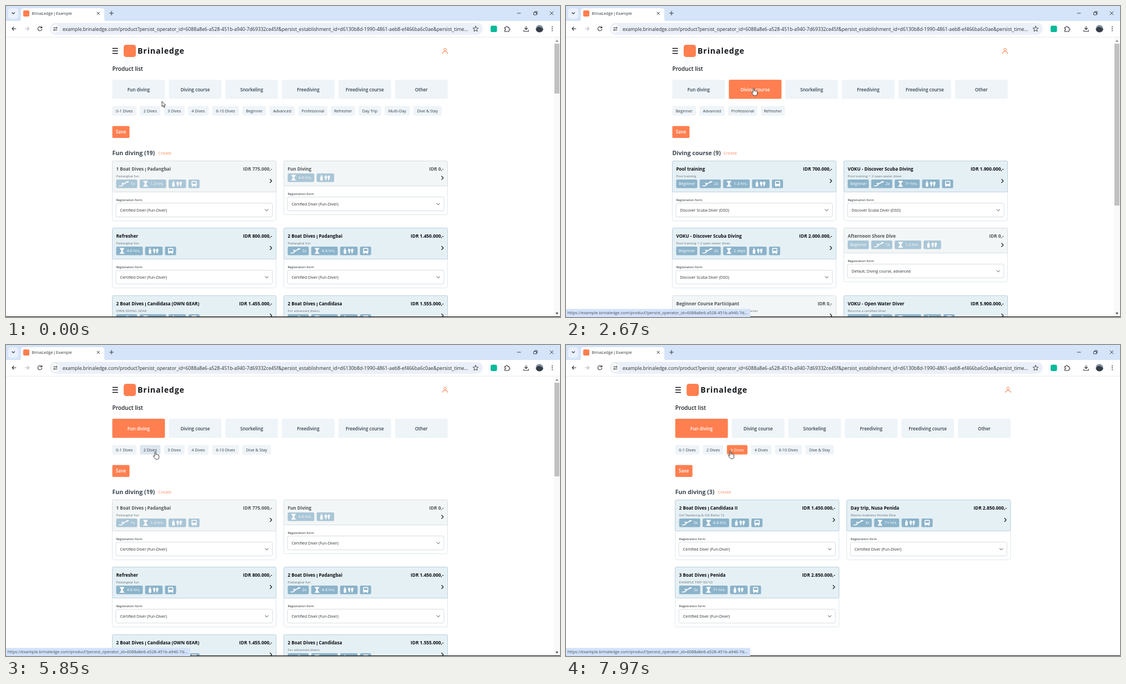
An HTML page that plays this animation: 998 px wide and 561 px high, repeating every 8 s.

```html
<!DOCTYPE html>
<html lang="en">
<head>
<meta charset="utf-8">
<title>BrinaLedge | Example</title>
<style>
  html, body { margin: 0; width: 100%; height: 100%; overflow: hidden; background: #fff; }
  svg { display: block; width: 100vw; height: 100vh; font-family: "Open Sans", "Noto Sans", sans-serif; }
  .line { fill: none; stroke-linecap: round; stroke-linejoin: round; }
</style>
</head>
<body>
<svg id="stage" viewBox="0 0 998 561"></svg>
<script>
const LOOP = 8000;
const CORAL = '#ff7f50', TAB = '#eef4f8', HOVER = '#dde6ee', TAG = '#8bb3ca';
const stage = document.getElementById('stage');

// ---------- drawing helpers ----------
const rect = (x, y, w, h, fill, r = 0, more = '') =>
  `<rect x="${x}" y="${y}" width="${w}" height="${h}" rx="${r}" fill="${fill}" ${more}/>`;
const circle = (x, y, r, fill, more = '') => `<circle cx="${x}" cy="${y}" r="${r}" fill="${fill}" ${more}/>`;
const line = (d, color, width = 1) => `<path class="line" d="${d}" stroke="${color}" stroke-width="${width}"/>`;
const fill = (d, color) => `<path d="${d}" fill="${color}"/>`;
const at = (x, y, body, more = '') => `<g transform="translate(${x} ${y})" ${more}>${body}</g>`;
const text = (x, y, s, size, color, weight = 400, anchor = 'start', more = '') =>
  `<text x="${x}" y="${y}" font-size="${size}" fill="${color}" font-weight="${weight}" text-anchor="${anchor}" ${more}>` +
  s.replace(/&/g, '&amp;').replace('|', '<tspan font-family="Liberation Sans, sans-serif">|</tspan>') + '</text>';

// ---------- content ----------
const HOST = 'example.brinaledge.com/product?persist_operator_id=6088a8e6-a528-451b-a940-7d';
const URL_TEXT = HOST + '69332ce45f&persist_establishment_id=d6130b8d-1990-4861-aeb8-ef466ba6c0ae&persist_time...';
const TABS = ['Fun diving', 'Diving course', 'Snorkeling', 'Freediving', 'Freediving course', 'Other'];
const CHIP_WIDTH = {
  '0-1 Dives': 43.5, '2 Dives': 37, '3 Dives': 37, '4 Dives': 37, '6-10 Dives': 48.5, 'Beginner': 42.5,
  'Advanced': 45.5, 'Professional': 52.5, 'Refresher': 43.5, 'Day Trip': 40.5, 'Multi-Day': 45.5, 'Dive & Stay': 51
};
const ALL_CHIPS = Object.keys(CHIP_WIDTH);
const FUN_CHIPS = [...ALL_CHIPS.slice(0, 5), 'Dive & Stay'];
const CERTIFIED = 'Certified Diver (Fun-Diver)', DISCOVER = 'Discover Scuba Diver (DSD)';
const BOAT = 'd2x,h4-6 hrs.,f,b';

const card = (title, price, sub, tags, form = CERTIFIED, off = false) => ({ title, price, sub, tags, form, off });
const padangbai = card('2 Boat Dives | Padangbai', '1.450.000', 'Padangbai fun', BOAT);
const ownGear = card('2 Boat Dives | Candidasa (OWN GEAR)', '1.455.000', 'OWN DIVING GEAR', BOAT);
const candidasa = card('2 Boat Dives | Candidasa', '1.555.000', 'For advanced divers', BOAT);

const FUN = [
  card('1 Boat Dives | Padangbai', '775.000', 'Padangbai fun', 'd1x,h1-3 hrs.,f,b', CERTIFIED, true),
  card('Fun Diving', '0', '', 'h4-6 hrs.,f', CERTIFIED, true),
  card('Refresher', '800.000', 'Padangbai fun', 'h4-6 hrs.,f,b'),
  padangbai, ownGear, candidasa
];
const COURSE = [
  card('Pool training', '700.000', 'Pool training', 'B,d2x,h1-3 hrs.,f,b', DISCOVER),
  card('VOKU - Discover Scuba Diving', '1.900.000', 'Pool training + 2 open water dives', 'B,d2x,h7+ hrs.,f,b', DISCOVER),
  card('VOKU - Discover Scuba Diving', '2.000.000', 'Pool training + 2 open water dives', 'B,d2x,h2 days,f,b', DISCOVER),
  card('Afternoon Shore Dive', '0', '', 'B,d1x,h1-2 hrs.,f', 'Default, Diving course, advanced', true),
  card('Beginner Course Participant', '0', 'For participants who start their course at the center', 'B,d2x', '', true),
  card('VOKU - Open Water Diver', '5.900.000', 'Become a certified diver', 'B,d4x,h3-4 days,f,b')
];
const SNORKEL = [
  card('Snorkel day trip, Padangbai', '1.100.000', 'Snorkeling in Padangbai', 's2x,h4-6 hrs.,m,b', 'Snorkeler or Non-Diver'),
  card('Snorkel day trip, Nusa Penida', '1.100.000', "Snorkeling with Manta's", 's3x,h7+ hrs.,m,b', 'Snorkeler or Non-Diver'),
  card('Snorkel day trip, Nusa Penida', '1.100.000', "Snorkeling with Manta's", 's6x,h2 days,m,b', 'Course Participant, Beginner (Uncertified)')
];
const TWO_DIVES = [
  padangbai, ownGear, candidasa,
  card('2 Boat Dives | Padangbai', '1.600.000', 'MOSSYGILL EXAMPLE PRODUCT', BOAT, 'Mossy Gill example onboarding'),
  card('2 Boat Dives | Penida', '1.800.000', 'Penida day trip', BOAT),
  card('2 Shore Dives | Amed', '1.800.000', 'Shore diving day trip', 'd2x,h7+ hrs.,f,b')
];
const THREE_DIVES = [
  card('2 Boat Dives | Candidasa II', '1.450.000', 'Gili Tepekong & Gili Biaha 12', 'd3x,h4-6 hrs.,f,b'),
  card('Day trip, Nusa Penida', '2.850.000', 'Manta madness Penida Dive', 'd3x,h7+ hrs.,f,b'),
  card('3 Boat Dives | Penida', '2.850.000', 'EXAMPLE TRIP 3D/1D', 'd3x,h7+ hrs.,f,b')
];

// thumb is the lower end of the scrollbar thumb; 0 means the page does not scroll
const SCENES = [
  { from: 0, tab: -1, chips: ALL_CHIPS, title: 'Fun diving (19)', create: 82.7, cards: FUN, thumb: 158 },
  { from: 1040, tab: 0, chips: FUN_CHIPS, title: 'Fun diving (19)', create: 82.7, cards: FUN, thumb: 237 },
  { from: 2400, tab: 1, chips: ALL_CHIPS.slice(5, 9), title: 'Diving course (9)', create: 92.3, cards: COURSE, thumb: 360 },
  { from: 3940, tab: 2, chips: ALL_CHIPS.slice(9, 11), title: 'Snorkeling (3)', create: 77.5, cards: SNORKEL, thumb: 0 },
  { from: 5190, tab: 0, chips: FUN_CHIPS, title: 'Fun diving (19)', create: 82.7, cards: FUN, thumb: 237 },
  { from: 6640, tab: 0, chips: FUN_CHIPS, chip: '2 Dives', title: 'Fun diving (19)', create: 82.7, cards: TWO_DIVES, thumb: 238 },
  { from: 7940, tab: 0, chips: FUN_CHIPS, chip: '3 Dives', title: 'Fun diving (3)', create: 76.5, cards: THREE_DIVES, thumb: 0 }
];

// ---------- product cards ----------
const FINS = fill('M14 6q2.5-5 4.7 0l-1.5 6.5h-1zM19.5 6q2.5-5 4.7 0l-2.2 6.5h-1z', '#fff');
const ICONS = {
  d: line('M5.5 11.5h4l4.5-4-3.5-.8M14 7.5l4-2 4-1.5', '#fff', 1.7) + circle(19.5, 4, 1.3, '#fff'),
  s: line('M5.5 7l4 3.5 6-.5 5 1', '#fff', 1.7) + circle(23, 9, 1.5, '#fff'),
  h: line('M6.5 3h8M6.5 12.5h8', '#fff', 1.2) + fill('M7.5 3h6v2.2l-2.2 2.5 2.2 2.5v2.3h-6v-2.3l2.2-2.5-2.2-2.5z', '#fff'),
  f: rect(6.5, 5, 4.5, 8, '#fff', 1.5) + rect(7.7, 2.5, 2, 2, '#fff') + FINS,
  m: line('M7 3.5v6q0 2 4 1.5l1-3', '#fff', 1.3) + FINS,
  b: rect(5.5, 2.5, 9.5, 9, '#fff', 1.5) + rect(7, 4.2, 6.5, 3.6, TAG) +
     rect(6.3, 11, 2, 2, '#fff') + rect(12.2, 11, 2, 2, '#fff'),
  B: ''
};
const TAG_WIDTH = { d: 38, s: 41, f: 31.5, m: 31.5, b: 20, B: 38 };
const LABEL_X = { d: 26, s: 29, h: 19, B: 4.5 };

function drawTags(list) {
  let x = 0, out = '';
  for (const tag of list.split(',')) {
    const kind = tag[0], label = kind === 'B' ? 'Beginner' : tag.slice(1);
    const w = TAG_WIDTH[kind] || 27 + 2.6 * label.length;
    out += at(x, 0, rect(0, 0, w, 15.5, TAG, 2) + ICONS[kind] +
      (label ? text(LABEL_X[kind], 10.3, label, 7.1, '#fff') : ''));
    x += w + 4.3;
  }
  return out;
}

function drawCard(c, x, y) {
  const head = c.sub ? 56 : 45, ink = c.off ? '#50565b' : '#0c0e10', mid = head / 2 + 8;
  return at(x, y,
    rect(0, 0, 295, head + 52, '#fff', 3, 'stroke="#dde7ee"') +
    rect(0, 0, 295, head, c.off ? '#f3f6f6' : '#e5f0f5', 2, `stroke="${c.off ? '#d3dee6' : '#b7cddd'}" stroke-width=".9"`) +
    text(7, 17, c.title, 8.1, ink, 700) +
    text(288, 17, `IDR ${c.price},-`, 8.3, ink, 700, 'end') +
    text(7, 29, c.sub, 6.15, '#68727a') +
    at(7, head - 22.5, drawTags(c.tags), c.off ? 'opacity=".7"' : '') +
    line(`M284.3 ${mid - 3}l3 3-3 3`, '#1c2226', 1.2) +
    text(7, head + 16, 'Registration form', 5.8, '#1c2226') +
    rect(6.5, head + 20, 282, 25, '#fff', 3, 'stroke="#d6dce1"') +
    text(14, head + 35.3, c.form, 7, '#2d3338') +
    line(`M275.5 ${head + 31.5}l2.7 2.7 2.7-2.7`, '#39434b', 1));
}

// ---------- pages ----------
function buildScene(s) {
  const left = s.thumb ? 191.5 : 196.8, hits = [];
  let out = '';
  const button = (x, y, w, h, label, size, weight, base, on) => {
    hits.push({ x, y, w, h, on });
    out += rect(x, y, w, h, on ? CORAL : TAB, 2, 'class="hit"') +
      text(x + w / 2, base, label, size, on ? '#fff' : '#36414c', weight, 'middle');
  };
  for (const y of [76.5, 81, 85.5]) out += line(`M${left + .7} ${y}h9`, '#111', 1.4);
  out += rect(left + 20.5, 70, 22, 22, CORAL, 4.5);
  out += text(left + 45.5, 85.6, 'Brinaledge', 14.1, '#15181b', 700, 'start', 'letter-spacing=".9"');
  out += at(left + 599.5, 81, circle(0, -2.5, 2.3, 'none', `stroke="${CORAL}"`) + line('M-4.5 4.5q0-3.5 4.5-3.5t4.5 3.5', CORAL, 1.1));
  out += text(left, 116.7, 'Product list', 10.1, '#1c2329', 600);

  TABS.forEach((label, i) => button(left + i * 101.85, 133, 94.8, 34.5, label, 8.1, 600, 153.6, i === s.tab));
  let x = left;
  for (const label of s.chips) {
    const w = CHIP_WIDTH[label];
    button(x, 180.5, w, 17, label, 7.2, 400, 191.6, label === s.chip);
    x += w + 6.3;
  }
  out += rect(left, 216.5, 31, 21.5, CORAL, 2) + text(left + 15.5, 230.4, 'Save', 8.2, '#fff', 600, 'middle');
  out += text(left, 268.6, s.title, 10.6, '#3a4550', 700) + text(left + s.create, 268.4, 'Create', 7.9, '#ff8e64');
  s.cards.forEach((c, i) => out += drawCard(c, left + (i % 2) * 309, 279.5 + Math.round(121.4 * (i >> 1))));
  if (s.thumb) {
    out += rect(987.5, 57, 10.5, 503, '#f9f9f9') + rect(988, 68, 9, s.thumb - 68, '#c1c1c1') +
      fill('M989.8 64.5l2.7-3.5 2.7 3.5z', '#8a8a8a') + fill('M989.8 553l2.7 3.5 2.7-3.5z', '#505050');
  }
  const g = document.createElementNS(stage.namespaceURI, 'g');
  g.innerHTML = out;
  g.querySelectorAll('.hit').forEach((el, i) => hits[i].el = el);
  return { g, hits, from: s.from };
}

function drawBrowser() {
  const ink = '#30343a';
  return rect(0, 0, 998, 28, '#d6e4fa') + rect(4, 4, 18, 19, '#eaf1fd', 5) + line('M11 12l2.2 2.2 2.2-2.2', ink, 1.2) +
    fill('M22 28q5 0 5-5V9q0-5 5-5h140q5 0 5 5v14q0 5 5 5z', '#fff') + rect(0, 27, 998, 29, '#fff') +
    rect(31, 8, 11, 11, CORAL, 2) + text(46.5, 16, 'BrinaLedge | Example', 7.2, ink) +
    line('M164 11l4.5 4.5m0-4.5l-4.5 4.5M190 9.5v7m-3.5-3.5h7', ink, 1) +
    line('M921 13h6M951 11.5h4.5V16H951zM952.5 11.5V10h4.5v4.5h-1.5M980 10l6 6m0-6l-6 6', ink, .9) +
    line('M18 41h-7m3-3l-3 3 3 3', ink, 1.1) + line('M34.5 41h7m-3-3l3 3-3 3', '#b4b8bd', 1.1) +
    line('M64 38.8a3.7 3.7 0 1 0 .7 3M64.8 37v2.5h-2.5', ink, 1.1) +
    rect(79, 30.5, 780, 21.5, '#ebf0f8', 10.7) + circle(89, 41.2, 7.2, '#fff') +
    line('M85.5 39.3h3.5M89 43.2h3.5', ink, 1) +
    circle(91, 39.3, 1.2, 'none', `stroke="${ink}"`) + circle(87, 43.2, 1.2, 'none', `stroke="${ink}"`) +
    text(102, 44.7, URL_TEXT, 8.68, '#2a2e33') +
    line('M846 36.5l1.4 3.2 3.4.3-2.6 2.3.8 3.4-3-1.8-3 1.8.8-3.4-2.6-2.3 3.4-.3z', ink, .9) +
    rect(873, 35.5, 11.5, 11.5, '#08b99a', 2.5) +
    line('M898.5 38.5h2.2q0-2 1.5-2t1.5 2h2.3v2.3q2 0 2 1.5t-2 1.5V46h-7.5v-2.5q1.5 0 1.5-1.3t-1.5-1.3z', ink, 1.1) +
    line('M937 36.5v6m-2.5-2.5l2.5 2.5 2.5-2.5M932.8 43.5v2.2h8.4v-2.2', ink, 1.1) +
    circle(961, 41, 6.7, '#8594a5') + fill('M954.5 42q3-5 7-4t6.2 3.5a6.7 6.7 0 0 1-13.2.5z', '#353d47') +
    [37.5, 41, 44.5].map(y => circle(984, y, .9, ink)).join('') + rect(0, 55.7, 998, .8, '#dfe3e8');
}

const scenes = SCENES.map(buildScene);
scenes.forEach(s => stage.append(s.g));
stage.insertAdjacentHTML('beforeend',
  drawBrowser() + rect(0, 560, 998, 1, '#111') +
  `<g id="status">${rect(0, 546.5, 332, 14.5, '#d3e2fa', 1)}${text(2.5, 556.2, 'https://' + HOST + '...', 7.45, '#474d55')}</g>
  <g id="arrow" stroke="#111" stroke-width=".8">${fill('M0 0v9.5l2.1-1.9 1.5 3.4 1.5-.7-1.5-3.3h2.9z', '#fff')}</g>
  <g id="hand" stroke="#111" stroke-width=".8">${fill('M-1 1.2q0-1.2 1-1.2t1 1.2v4q.3-.8 1.2-.6t.9.9q1.7-.8 1.9.6 1.6-.4 1.6 1v3q0 3-2.4 3.6h-3q-1.6-.7-3-3l-2-3q.8-1.4 2.8.4z', '#fff')}</g>`);
const [status, arrow, hand] = ['status', 'arrow', 'hand'].map(id => document.getElementById(id));

// ---------- motion ----------
const PATH = [ // time, x, y
  [80, 281, 172], [570, 240, 149], [1450, 240, 149], [1750, 317, 148], [1850, 338, 148], [3130, 338, 148],
  [3700, 435.5, 148.5], [4200, 435.5, 148.5], [4620, 272.5, 147.5], [4690, 246, 148], [5590, 246, 148],
  [5740, 269, 192.5], [6640, 269, 192.5], [6800, 273.5, 192.5], [7520, 273.5, 192.5], [7790, 296, 191.5]
];
function cursorAt(t) {
  const i = PATH.findIndex(p => p[0] > t);
  if (i < 1) return (i ? PATH[PATH.length - 1] : PATH[0]).slice(1);
  const [a, b] = [PATH[i - 1], PATH[i]], k = (t - a[0]) / (b[0] - a[0]);
  return [a[1] + (b[1] - a[1]) * k, a[2] + (b[2] - a[2]) * k];
}
const hitAt = (hits, [x, y]) => hits.find(h => x >= h.x && x <= h.x + h.w && y >= h.y && y <= h.y + h.h);
const show = (el, on) => el.setAttribute('display', on ? 'inline' : 'none');

function render(t) {
  const scene = scenes.filter(s => s.from <= t).pop();
  scenes.forEach(s => show(s.g, s === scene));
  const hovered = hitAt(scene.hits, cursorAt(t - 100)); // highlight lags the pointer
  for (const h of scene.hits) h.el.setAttribute('fill', h.on ? CORAL : h === hovered ? HOVER : TAB);

  const pos = cursorAt(t), link = !!hitAt(scene.hits, pos);
  show(hand, link);
  show(arrow, !link);
  (link ? hand : arrow).setAttribute('transform', `translate(${pos})`);
  show(status, t >= 730);
}

const start = performance.now();
function tick() {
  render((performance.now() - start) % LOOP);
  requestAnimationFrame(tick);
}
tick();
</script>
</body>
</html>
```
